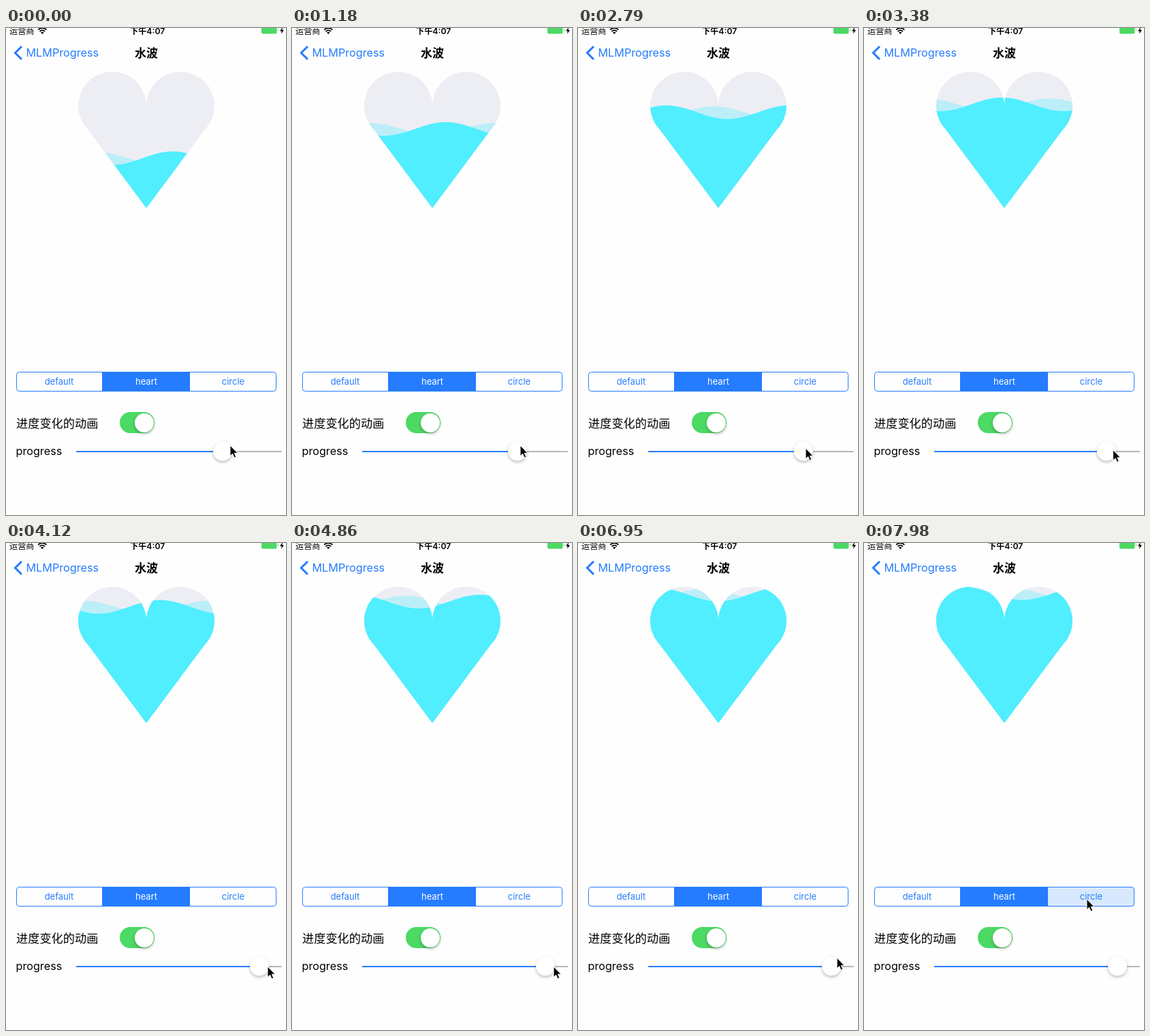
These frames come from a looping animation (411 by 714 pixels, 8 s). An HTML page:

```html
<!DOCTYPE html>
<html lang="zh-CN">
<head>
<meta charset="utf-8">
<title>水波</title>
<style>
  html, body { margin: 0; width: 100%; height: 100%; overflow: hidden; background: #fefefe; }
  svg { display: block; width: 411px; height: 714px; }
  text { font-family: Inter, "Noto Sans CJK SC", "Noto Sans CJK", sans-serif; }
  .status { font-size: 12.2px; }
  .title { font-size: 17px; font-weight: 700; }
  .back { font-size: 16.2px; }
  .label { font-size: 17.2px; }
  .tab { font-size: 13px; text-anchor: middle; }
  .blue { fill: #257cff; }
  .shadow { filter: drop-shadow(0 2px 2px rgba(0, 0, 0, .27)); }
</style>
</head>
<body>
<svg viewBox="0 0 411 714">
  <defs>
    <clipPath id="heart">
      <path id="heartShape" d="M206 264L120.6 149.4A50 50 0 1 1 206 114A50 50 0 1 1 291.4 149.4Z"/>
    </clipPath>
    <clipPath id="tabs"><rect x="15" y="504" width="382" height="29" rx="4"/></clipPath>
  </defs>
  <rect width="411" height="714" fill="#fefefe"/>

  <text class="status" x="5" y="9">运营商</text>
  <g fill="none" stroke="#000" stroke-width="1.8">
    <path d="M47.2 2.6Q53.3 -2.4 59.4 2.6M49.5 5Q53.3 1.8 57.1 5"/>
    <path d="M53.3 9L51 6.6Q53.3 4.8 55.6 6.6Z" fill="#000" stroke="none"/>
  </g>
  <text class="status" x="182" y="9" font-weight="600">下午4:07</text>
  <rect x="375" y="-3" width="22.5" height="11.5" rx="2" fill="#4cd964"/>
  <path d="M399 1q2 2 0 4z" fill="#4cd964"/>
  <path d="M406 -1L402 4.6H404.6L404 8.5L408 3H405.4Z"/>

  <path d="M23 27L13.5 36.5L23 46" fill="none" stroke="#257cff" stroke-width="3"/>
  <text class="back blue" x="29.5" y="42">MLMProgress</text>
  <text class="title" x="189" y="42.5">水波</text>

  <use href="#heartShape" fill="#edeef4"/>
  <g clip-path="url(#heart)">
    <path id="rearWave" fill="#bceef8"/>
    <path id="frontWave" fill="#50eeff"/>
  </g>

  <g clip-path="url(#tabs)">
    <rect class="blue" x="141" y="504" width="129" height="29"/>
    <rect id="pressed" x="270" y="504" width="127" height="29" fill="#d8e9fd"/>
  </g>
  <rect x="15.5" y="504.5" width="381" height="28" rx="4" fill="none" stroke="#257cff"/>
  <text class="tab blue" x="78" y="523">default</text>
  <text class="tab" x="206" y="523" fill="#fff">heart</text>
  <text class="tab blue" x="333.5" y="523">circle</text>

  <text class="label" x="15" y="585.5">进度变化的动画</text>
  <rect x="167" y="563" width="51" height="31" rx="15.5" fill="#4cd964"/>
  <circle class="shadow" cx="203" cy="579" r="14" fill="#fff"/>

  <text x="14.5" y="626" font-size="16.2">progress</text>
  <rect x="103" y="620" width="302" height="2" rx="1" fill="#b7b7b7"/>
  <rect id="filled" class="blue" x="103" y="620" height="2" rx="1"/>
  <circle id="knob" class="shadow" cy="620.5" r="14" fill="#fff"/>
  <path id="cursor" d="M0 0V15.5L3.6 12.3L6 18L8.7 16.8L6.3 11.3H11Z"
        stroke="#fff" stroke-width="1"/>
</svg>
<script>
  const LOOP = 8000, STEP = 147.5, LAST_STEP = 54;
  const WAVELENGTH = 180, REAR_SHIFT = 70;

  // Keys are [ms, value] pairs.
  const level = [[0, 191], [300, 178.5], [600, 167], [900, 157], [1180, 148], [1770, 136],
    [2350, 127], [2790, 122], [3380, 109], [3530, 104], [4100, 94], [4710, 87],
    [4860, 86], [5350, 82], [5900, 79], [6950, 75.5], [7980, 73.5]];
  const crest = [[0, 245], [1180, 46], [2790, -255], [3380, -361],
    [4860, -622], [5900, -810], [7980, -1118]];
  const knobX = [[150, 318], [900, 331], [2790, 331], [3380, 363], [3530, 372]];
  const cursorX = [[0, 329], [1180, 335], [1750, 340], [2350, 339], [2790, 332],
    [3380, 375], [3530, 384], [6500, 384], [6950, 380], [7550, 327]];
  const cursorY = [[1180, 612], [1750, 614], [2350, 614], [2790, 617],
    [3380, 619], [3530, 621], [6500, 621], [6950, 608], [7550, 522]];

  const el = id => document.getElementById(id);

  function valueAt(keys, t) {
    const next = keys.findIndex(([time]) => time > t);
    if (next === 0) return keys[0][1];
    if (next < 0) return keys[keys.length - 1][1];
    const [t0, v0] = keys[next - 1], [t1, v1] = keys[next];
    return v0 + (v1 - v0) * (t - t0) / (t1 - t0);
  }

  function wavePath(mean, peakX, amplitude) {
    let d = "M104 266";
    for (let x = 104; x <= 308; x += 2) {
      const y = mean - amplitude * Math.cos((x - peakX) * 2 * Math.PI / WAVELENGTH);
      d += `L${x} ${y.toFixed(2)}`;
    }
    return d + "L308 266Z";
  }

  function draw(now) {
    const step = Math.min(LAST_STEP, Math.floor((now % LOOP + 10) / STEP));
    const t = step * 147.7;
    const mean = valueAt(level, t), peak = valueAt(crest, t), knob = valueAt(knobX, t);
    el("frontWave").setAttribute("d", wavePath(mean, peak, 10));
    el("rearWave").setAttribute("d", wavePath(mean, peak + REAR_SHIFT, 8.7));
    el("knob").setAttribute("cx", knob);
    el("filled").setAttribute("width", knob - 103);
    el("cursor").setAttribute("transform",
      `translate(${valueAt(cursorX, t)} ${valueAt(cursorY, t)})`);
    el("pressed").setAttribute("visibility", step >= 53 ? "visible" : "hidden");
  }

  const start = performance.now();
  function tick() {
    draw(performance.now() - start);
    requestAnimationFrame(tick);
  }
  tick();
</script>
</body>
</html>
```
